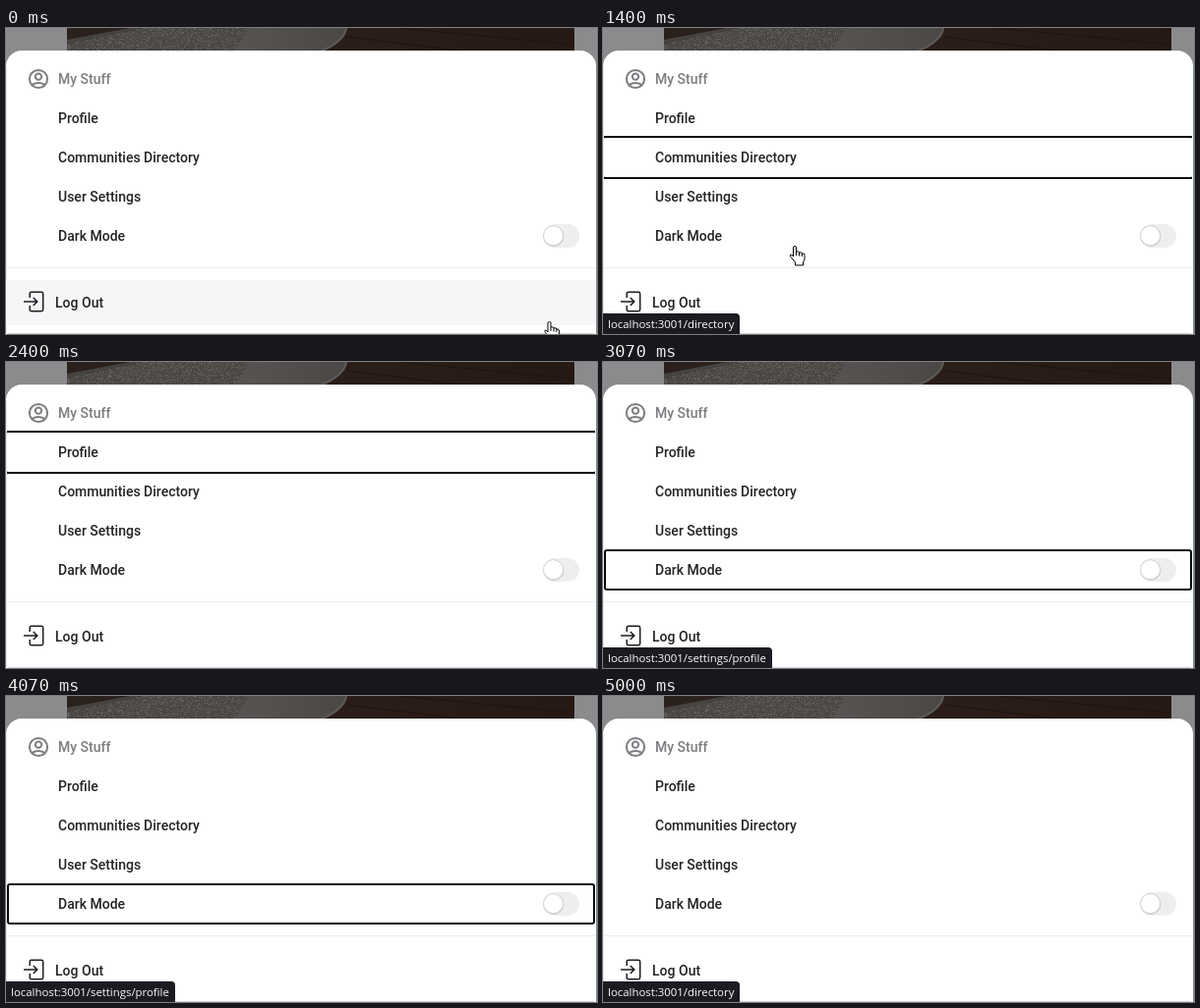
An HTML page for the animation above (5.07 s loop, 601 by 312 pixels).

```html
<!DOCTYPE html>
<html lang="en">
<head>
<meta charset="utf-8">
<title>Menu focus order</title>
<style>
  html, body { margin: 0; width: 100%; height: 100%; overflow: hidden; background: #8b8b8d; }
  svg { display: block; width: 601px; height: 312px; }
  .label { font: 450 14px Roboto, sans-serif; fill: #242427; }
  .muted { fill: #7d7d82; }
  #url { font: 11.4px "Open Sans", sans-serif; fill: #fbfbfe; }
</style>
</head>
<body>
<svg viewBox="0 0 601 312" xmlns="http://www.w3.org/2000/svg">
  <defs>
    <linearGradient id="wood">
      <stop offset="0" stop-color="#2a211d"/>
      <stop offset=".6" stop-color="#2b1d17"/>
      <stop offset="1" stop-color="#261913"/>
    </linearGradient>
    <linearGradient id="mat">
      <stop offset="0" stop-color="#575453"/>
      <stop offset="1" stop-color="#4a4745"/>
    </linearGradient>
    <clipPath id="inner"><rect x="1" y="0" width="598" height="312"/></clipPath>
    <clipPath id="photo"><rect x="62" y="0" width="516" height="24"/></clipPath>
    <clipPath id="rug"><path d="M62 16L138 0H248L232 24H62z"/></clipPath>
  </defs>

  <rect width="601" height="312" fill="#8b8b8d"/>
  <g clip-path="url(#photo)">
    <rect x="62" width="516" height="24" fill="url(#wood)"/>
    <path d="M62 16L138 0H260V24H62z" fill="#4a4745"/>
    <path id="grain" fill="#625f5d" clip-path="url(#rug)"/>
    <path d="M62 12L126 0H138L62 16z" fill="#474340"/>
    <path d="M248 0H347Q345 14 320 24H232z" fill="url(#mat)"/>
    <path d="M346 0Q344 14 319 24" stroke="#5e5a58" stroke-width="2" fill="none"/>
    <path d="M347 9L470 24M400 0L578 17" stroke="#1e1410" fill="none"/>
  </g>

  <path d="M0 312V39A16 16 0 0 1 16 23H584A16 16 0 0 1 600 39V312z" fill="#fff"/>
  <path d="M.5 311V39" stroke="#d6d6d9" stroke-width=".6"/>
  <path d="M2 311.5H598" stroke="#d4d4d8"/>
  <rect id="edge" x="600" y="34" width="1" height="278"/>
  <rect id="hover" y="257" width="600" height="46" fill="#f5f6f8"/>
  <path d="M1 244.5H600" stroke="#ededf0"/>

  <g fill="none" stroke="#7d7d82" stroke-width="2">
    <circle cx="33" cy="52" r="9.1"/>
    <circle cx="33" cy="49.6" r="3.2"/>
    <path d="M26.8 58.4Q28.5 56 33 56T39.2 58.4"/>
  </g>
  <g fill="none" stroke="#1d1d20" stroke-width="1.5">
    <path d="M24.2 275V271Q24.2 269.3 26 269.3H36Q37.7 269.3 37.7 271V287Q37.7 288.7 36 288.7H26Q24.2 288.7 24.2 287V283"/>
    <path d="M18 279H31.5M27.8 275L31.8 279L27.8 283"/>
  </g>

  <g id="labels"></g>

  <rect x="546" y="200" width="37" height="24" rx="12" fill="#eeeeef"/>
  <circle cx="556.9" cy="212.4" r="10.5" fill="#cfcfd2"/>
  <circle cx="556.6" cy="211.7" r="10" fill="#fff" stroke="#c8c8cc" stroke-width=".7"/>

  <rect id="ring" rx="2" fill="none" stroke="#0c0c0e" stroke-width="2" clip-path="url(#inner)"/>

  <g id="bubble">
    <path id="panel" fill="#1c1b22"/>
    <text id="url" x="5" y="306"></text>
  </g>

  <g id="cursor" fill="#fff" stroke="#000" stroke-linejoin="round">
    <path id="arrow" d="M.5 .5V16.5L4.3 13L7 19.2L9.6 18L7 12H12z"/>
    <path id="hand" d="M3.5 12V3Q3.5 1.5 5 1.5T6.5 3V7Q9 6 9.5 8Q12 7 12.3 9Q15 8.2 15 11V15L13.5 18V21H5.5V18L1 12.5Q-.5 10.5 1 10Q2.3 9.8 3.5 12zM6.5 7V11M9.5 8V11.5M12.3 9V12"/>
  </g>
</svg>
<script>
const LOOP = 5070, TICKS = 76;
const el = id => document.getElementById(id);
const set = (node, attrs) => {
  for (const k in attrs) node.setAttribute(k, attrs[k]);
};

const labels = [
  ["My Stuff", 53, 57, "label muted"], ["Profile", 53, 97], ["Communities Directory", 53, 137],
  ["User Settings", 53, 177], ["Dark Mode", 53, 217], ["Log Out", 50, 285]
];
for (const [text, x, y, cls = "label"] of labels) {
  const node = document.createElementNS("http://www.w3.org/2000/svg", "text");
  set(node, { x, y, class: cls });
  node.textContent = text;
  el("labels").append(node);
}

// Seeded specks give the rug its weave.
let seed = 7;
const rand = max => (seed = seed * 16807 % 2147483647) % max;
const speck = () => `M${62 + rand(190)} ${rand(24)}h1v1h-1z`;
set(el("grain"), { d: Array.from({ length: 1100 }, speck).join("") });

// All keys are [tick, value]; a tick is 1/15 s.
const focus = [[0, -1], [15, 0], [21, 1], [24, 2], [29, 3], [36, 0], [41, 1], [44, 2], [46, 3],
  [51, 0], [56, 1], [58, 2], [61, 3], [66, 0], [69, 1], [75, -1]];
const fade = [[15, 0], [18, 1], [29, 1], [33, 0], [37, 0], [39, 1], [49, 1], [51, .5],
  [53, 1], [63, 1], [66, .4], [68, 1]];
const hoverFade = [[9, 1], [12, 0]];
const links = [["profile", 127], ["directory", 139], ["settings/profile", 172]];

const hold = (keys, n) => keys.filter(k => k[0] <= n).pop()[1];
const clamp = v => Math.max(0, Math.min(1, v));
const ease = v => v * v * (3 - 2 * v);
const mix = (a, b, p) => a + (b - a) * p;

function lerp(keys, n) {
  if (n <= keys[0][0]) return keys[0][1];
  for (let i = 1; i < keys.length; i++) {
    const [a, from] = keys[i - 1], [b, to] = keys[i];
    if (n <= b) return mix(from, to, (n - a) / (b - a));
  }
  return keys[keys.length - 1][1];
}

// Link rows run past the clip, so only their corners and long sides show.
function drawRing(row) {
  el("ring").style.display = row < 0 ? "none" : "";
  if (row === 3) set(el("ring"), { x: 2, y: 192, width: 596, height: 40 });
  else set(el("ring"), { x: 0, y: 71 + 40 * row, width: 600, height: 42 });
}

function drawBubble(row, n) {
  const [path, w] = links[row < 0 ? 1 : Math.min(row, 2)];
  set(el("bubble"), { opacity: lerp(fade, n) });
  set(el("panel"), { d: `M0 312V291H${w - 4}Q${w} 291 ${w} 295V312z` });
  el("url").textContent = "localhost:3001/" + path;
}

function drawCursor(n) {
  const up = ease(clamp(n / 8)), out = ease(clamp((n - 15) / 10));
  const x = mix(547.5, 190, up), y = mix(298, 46, up) + 270 * out;
  const hand = y > 68;
  set(el("cursor"), { transform: `translate(${x} ${y})` });
  el("cursor").style.display = n > 25 ? "none" : "";
  el("hand").style.display = hand ? "" : "none";
  el("arrow").style.display = hand ? "none" : "";
}

function draw(ms) {
  const n = Math.floor((ms % LOOP + 8) * TICKS / LOOP) % TICKS;
  const row = hold(focus, n);
  drawRing(row);
  drawBubble(row, n);
  drawCursor(n);
  set(el("hover"), { opacity: lerp(hoverFade, n) });
  set(el("edge"), { fill: n >= 10 && n < 75 ? "#7c8f9e" : "#8b8b8d" });
}

const start = performance.now();
function loop() {
  draw(performance.now() - start);
  requestAnimationFrame(loop);
}
loop();
</script>
</body>
</html>
```
